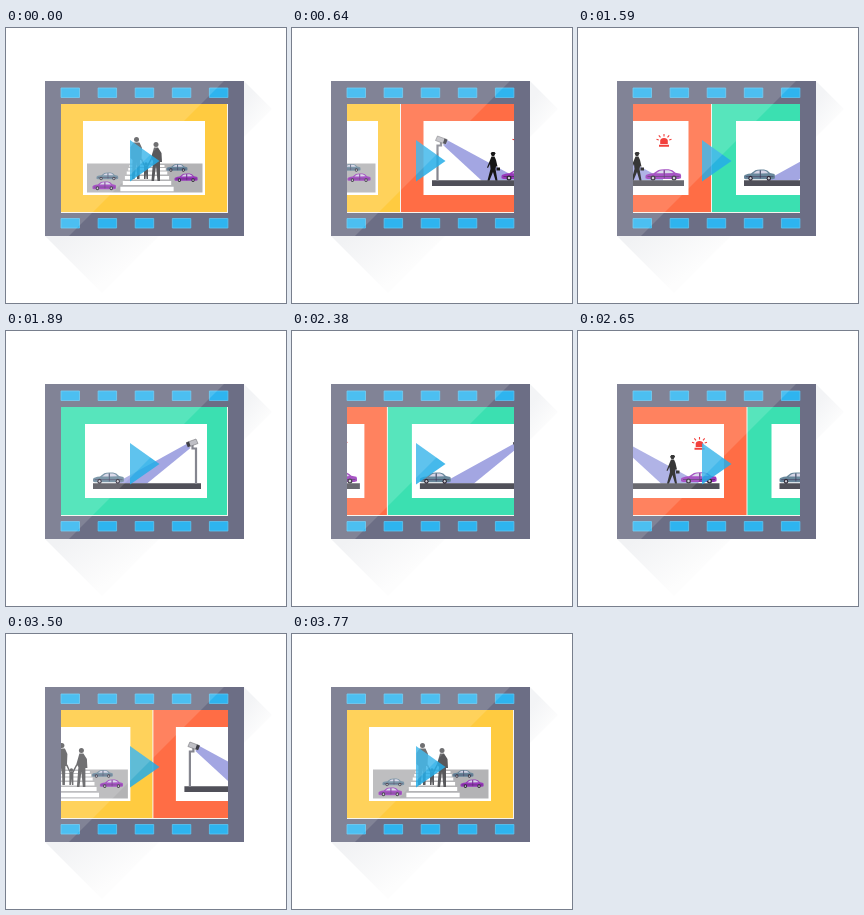
Recreate the animation shown at these times as an HTML page. Size 280 by 275 pixels, loop 3.84 s.

```html
<!DOCTYPE html>
<html lang="en">
<head>
<meta charset="utf-8">
<title>Film strip</title>
<style>
html, body { margin: 0; width: 100%; height: 100%; overflow: hidden; background: #fff; }
svg { display: block; }
.blue { color: #68879b; }
.purple { color: #9838ba; }
</style>
</head>
<body>
<svg width="280" height="275" viewBox="0 0 280 275">
  <defs>
    <clipPath id="window"><path d="M55 76h167v109h-167z"/></clipPath>
    <linearGradient id="shadeA" gradientUnits="userSpaceOnUse" x1="62" y1="205" x2="98" y2="255">
      <stop stop-color="#f1f2f4"/><stop offset="1" stop-color="#fdfdfd"/>
    </linearGradient>
    <linearGradient id="shadeB" gradientUnits="userSpaceOnUse" x1="238" y1="75" x2="260" y2="92">
      <stop stop-color="#f3f4f6"/><stop offset="1" stop-color="#fdfdfd"/>
    </linearGradient>
    <!-- side view, nose to the left, 36 x 11 -->
    <g id="car">
      <path fill="currentColor" d="M0 9V6.500Q1 4.500 8 4L13 .8Q15 0 19 0H23Q27 .3 30 3.500L35 4.500Q36 6 35.500 9L33 9.800H2z"/>
      <path fill="#d5d4e6" d="M10.500 4L14 1.700Q15.500 1 18 1V4zM19.500 1H23Q25.500 1.300 28 3.800L19.500 4z"/>
      <path stroke="#3c2b50" stroke-width=".6" d="M2 7.200H34M18.800 1V9"/>
      <g fill="#2c2733"><circle cx="7.500" cy="8.700" r="2.500"/><circle cx="28.500" cy="8.700" r="2.500"/></g>
      <g fill="#c9c9d2"><circle cx="7.500" cy="8.700" r="1.200"/><circle cx="28.500" cy="8.700" r="1.200"/></g>
    </g>
    <!-- pole and camera looking right -->
    <g id="camera">
      <path d="M91.500 153V117.500H95V113" fill="none" stroke="#85868f" stroke-width="2.200"/>
      <path d="M91.500 108L101 111.500L99 116L89.500 112.500z" fill="#bfbfc5" stroke="#77777d" stroke-width=".6"/>
      <path d="M98.500 110.500L101.500 111.700L99.700 116.300L97 115z" fill="#3d3d45"/>
    </g>
  </defs>

  <path fill="url(#shadeA)" d="M39 208L96 265L153 208z"/>
  <path fill="url(#shadeB)" d="M238 53L266 81L238 109z"/>
  <path fill="#6c6e85" d="M39 53H238V208H39z"/>
  <g id="holes" fill="#2eb4ef" stroke="#5cc6f3" stroke-width=".8"></g>

  <g clip-path="url(#window)">
    <path fill="#f6f4ee" d="M55 76h167v109h-167z"/>
    <g id="strip">
      <g>
        <path fill="#ffcb40" d="M55 76h166v108h-166z"/>
        <path fill="#fff" d="M77 93h122v74h-122z"/>
        <path fill="#b3b3b5" d="M81 135.500H196.500V164.500H81z"/>
        <g id="crossing" fill="#fff"></g>
        <g fill="#58585b">
          <circle cx="130.500" cy="111.500" r="2.500"/>
          <path d="M127.500 114.500H133.500L136 120L135.500 132H134L133.500 151H131L130.500 134L128.500 151H126L126.500 132L124.500 130V119z"/>
          <circle cx="150" cy="116.500" r="2.500"/>
          <path d="M148 119.500H152L155.500 125L156 134H154L154 153H151.500L150 138L148 153H145.500L147 133L145 130z"/>
          <circle cx="140" cy="136" r="1.700"/>
          <path d="M138 138L134.500 131L136 130.500L139 137.500H141L145 130L146 131L142 139V151H140.500L140 145L139.500 151H138z"/>
        </g>
        <g class="blue">
          <use href="#car" transform="translate(90.500 144.500) scale(.61 .7)"/>
          <use href="#car" transform="translate(160.500 136) scale(.59 .7)"/>
        </g>
        <g class="purple">
          <use href="#car" transform="translate(86.500 153.500) scale(.66 .78)"/>
          <use href="#car" transform="translate(168.500 145.500) scale(.65 .75)"/>
        </g>
      </g>
      <g>
        <path fill="#ff6d45" d="M55 76h166v108h-166z"/>
        <path fill="#fff" d="M77.500 93h121v74h-121z"/>
        <path fill="#a3a6e2" d="M101 112L173 151V152.500H135.500L97 117z"/>
        <path fill="#505059" d="M86 152.300H194V158H86z"/>
        <use href="#camera"/>
        <g fill="#161616">
          <circle cx="147" cy="126.300" r="1.900"/>
          <path d="M144.500 126H149.500V125.200L148.500 123.900H145.700z"/>
          <path d="M145.500 128.500H148.500L150 132L151.500 138.500H150L149.500 141L151.500 152.500H149.500L147 144L143.500 152.500H141.500L144.500 141L144 136L142 140L141 139.500z"/>
          <path d="M150.500 139.500h3.500v3h-3.500z"/>
        </g>
        <use href="#car" class="purple" x="155.500" y="141.300"/>
        <g fill="#f0201c">
          <path d="M170.200 116V112.500Q170.500 110 174 110T177.800 112.500V116zM169 116.800H179V118.800H169z"/>
          <path fill="none" stroke="#f0201c" stroke-width="1.100" d="M174 108.500V106M170.500 109.300L168.800 107.300M177.500 109.300L179.200 107.300M168.800 112L166.500 111.200M179.200 112L181.500 111.200"/>
        </g>
      </g>
      <g>
        <path fill="#3be0b1" d="M55 76h166v108h-166z"/>
        <path fill="#fff" d="M79 93h122v74h-122z"/>
        <path fill="#a3a6e2" d="M180.500 113L184.500 117L141 152.500H109z"/>
        <path fill="#505059" d="M87 152.300H195V158H87z"/>
        <use href="#camera" transform="matrix(-1 0 0 1 281.500 0)"/>
        <use href="#car" class="blue" transform="translate(87 141.500) scale(.87 1)"/>
      </g>
    </g>
  </g>

  <path fill="#25ade8" opacity=".85" d="M124 112V153.500L153.500 133z"/>
  <path fill="#fff" opacity=".14" d="M39 53H218L63 208H39z"/>
</svg>
<script>
const LOOP = 3840, STEP = 30, WIDTH = 167;
const slides = [[370, 16], [1290, 21], [2260, 20], [3200, 20]]; // start, steps
const keys = [                                                  // time, strip offset
  [340, 0], [640, 113], [820, WIDTH],
  [1260, WIDTH], [1290, 176], [1890, 2 * WIDTH],
  [2230, 2 * WIDTH], [2650, 219.5], [2830, WIDTH],
  [3170, WIDTH], [3200, 157.5], [3770, 0]
];

const rect = (x, y, w, h) => `<path d="M${x} ${y}h${w}v${h}h${-w}z"/>`;
const byId = id => document.getElementById(id);

for (let i = 0; i < 5; i++)
  for (const y of [60, 190.5])
    byId("holes").innerHTML += rect(55 + i * 37.1, y, 18.5, 9.5);

// stripes widen and thicken towards the viewer
for (let i = 0; i < 6; i++) {
  const y = 137 + 2.6 * i + .35 * i * i, half = 17.5 + (y - 137) * .42;
  byId("crossing").innerHTML += rect(141 - half, y, 2 * half, 2 + .5 * i);
}

const strip = byId("strip");
[...strip.children].forEach((panel, i) =>
  panel.setAttribute("transform", `translate(${i * WIDTH})`));

function offset(t) {
  const slide = slides.findLast(([start]) => start <= t);
  if (!slide) return 0;
  const [start, steps] = slide;
  const at = start + STEP * Math.min(steps - 1, Math.floor((t - start) / STEP));
  const i = keys.findIndex(([time]) => time >= at);
  const [t0, x0] = keys[i - 1], [t1, x1] = keys[i];
  return x0 + (x1 - x0) * (at - t0) / (t1 - t0);
}

const origin = performance.now();
function draw() {
  const t = (performance.now() - origin) % LOOP;
  strip.setAttribute("transform", `translate(${-offset(t)})`);
  requestAnimationFrame(draw);
}
draw();
</script>
</body>
</html>
```
